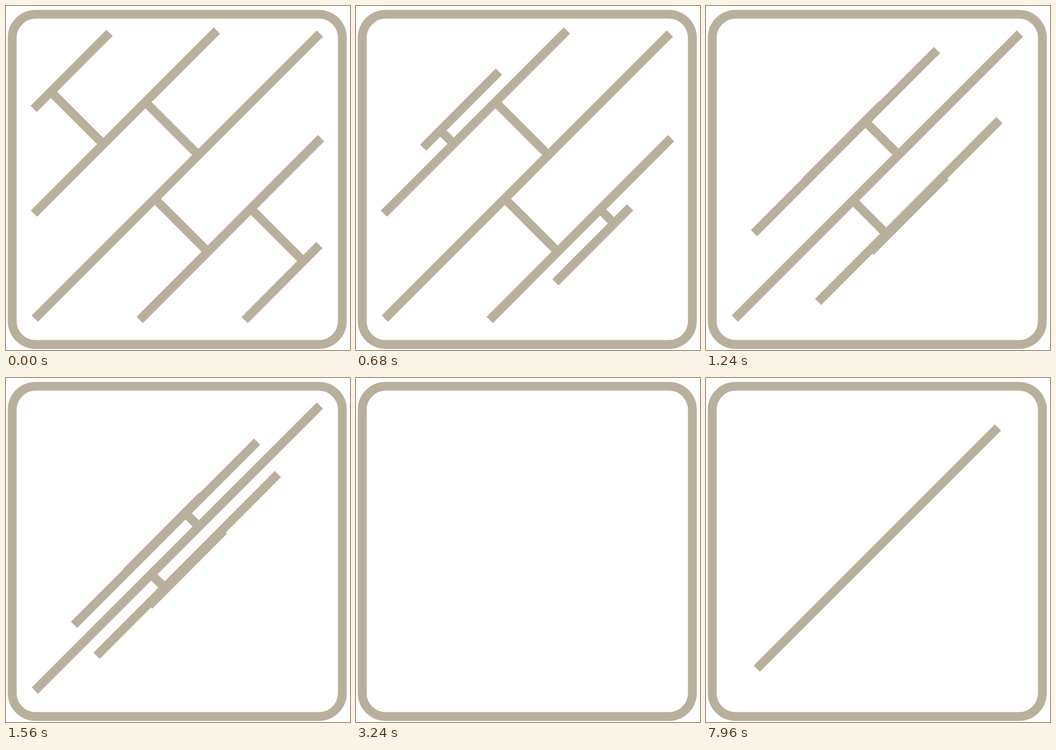
An HTML page with a canvas that plays this animation: 640 px wide and 640 px high, repeating every 8000 ms.

```html
<!DOCTYPE html>
<html lang="en">
<head>
<meta charset="utf-8">
<title>Folding bars</title>
<style>
  html, body { margin: 0; width: 100%; height: 100%; overflow: hidden; background: #fff; }
  canvas { display: block; width: 640px; height: 640px; }
</style>
</head>
<body>
<canvas id="stage" width="640" height="640"></canvas>
<script>
const ctx = document.getElementById('stage').getContext('2d');
const LOOP = 8000;
const COLOR = '#b8b09c';
const WEIGHT = 16.4;

// The motion is stepped: five uneven beats repeat every 560 ms.
const BEATS = [0, 140, 180, 320, 440];
const CYCLE = 560;
const FOLD_START = 120;
const GROW_START = 6840;
const FOLD_STEPS = 8;
const SHRINK_STEPS = 13;

const CENTER = { x: 318.8, y: 316.4, half: 265.2 };

// Bars run from lower left to upper right; step is the travel per beat.
// A link is given by the x - y of its centre line.
const SIDES = [
  {
    outer: { bar: [51.5, 191.5, 192.5, 50], step: [12.25, 12], link: -76 },
    inner: { bar: [52, 386.2, 392.4, 45.6], step: [12.45, 12.15], link: 80.6 }
  },
  {
    outer: { bar: [444, 584.2, 583, 444.8], step: [-12.17, -11.7], link: 78.5 },
    inner: { bar: [248.8, 584.1, 586.2, 245.9], step: [-13.4, -11.2], link: -81.7 }
  }
];

const clamp = (v, lo, hi) => Math.min(hi, Math.max(lo, v));

function beatsSince(start, t) {
  const d = t - start;
  if (d < 0) return 0;
  const inCycle = d % CYCLE;
  return Math.floor(d / CYCLE) * BEATS.length + BEATS.filter(b => b <= inCycle).length;
}

function line(x1, y1, x2, y2) {
  ctx.beginPath();
  ctx.moveTo(x1, y1);
  ctx.lineTo(x2, y2);
  ctx.stroke();
}

function shift([x1, y1, x2, y2], [dx, dy], n) {
  return [x1 + dx * n, y1 + dy * n, x2 + dx * n, y2 + dy * n];
}

const diagonal = bar => (bar[0] + bar[1] + bar[2] + bar[3]) / 2;

function link(part, n, from, to) {
  const d = part.link + (part.step[0] - part.step[1]) * n;
  line((from + d) / 2, (from - d) / 2, (to + d) / 2, (to - d) / 2);
}

function drawSide({ outer, inner }, n) {
  const first = Math.min(n, FOLD_STEPS);
  const second = clamp(n - FOLD_STEPS, 0, FOLD_STEPS);
  const innerBar = shift(inner.bar, inner.step, second);
  const outerBar = shift(shift(outer.bar, outer.step, first), inner.step, second);

  line(...innerBar);
  line(...outerBar);
  if (first < FOLD_STEPS) link(outer, first, diagonal(outerBar), diagonal(innerBar));
  if (second < FOLD_STEPS) link(inner, second, diagonal(innerBar), CENTER.x + CENTER.y);
}

function drawCenter(size) {
  if (size <= 0) return;
  const { x, y, half } = CENTER;
  const r = half * size;
  line(x - r, y + r, x + r, y - r);
}

function drawFrame() {
  ctx.beginPath();
  ctx.roundRect(11.6, 15.4, 614.2, 614.3, 43.5);
  ctx.stroke();
}

function render(t) {
  ctx.fillStyle = '#fff';
  ctx.fillRect(0, 0, 640, 640);
  ctx.strokeStyle = COLOR;
  ctx.lineWidth = WEIGHT;
  drawFrame();

  if (t >= GROW_START) {
    drawCenter(beatsSince(GROW_START, t) / SHRINK_STEPS);
    return;
  }
  const n = beatsSince(FOLD_START, t);
  const shrunk = clamp(n - 2 * FOLD_STEPS, 0, SHRINK_STEPS);
  if (!shrunk) SIDES.forEach(side => drawSide(side, n));
  drawCenter(1 - shrunk / SHRINK_STEPS);
}

const begin = performance.now();
function tick() {
  render((performance.now() - begin) % LOOP);
  requestAnimationFrame(tick);
}
tick();
</script>
</body>
</html>
```
